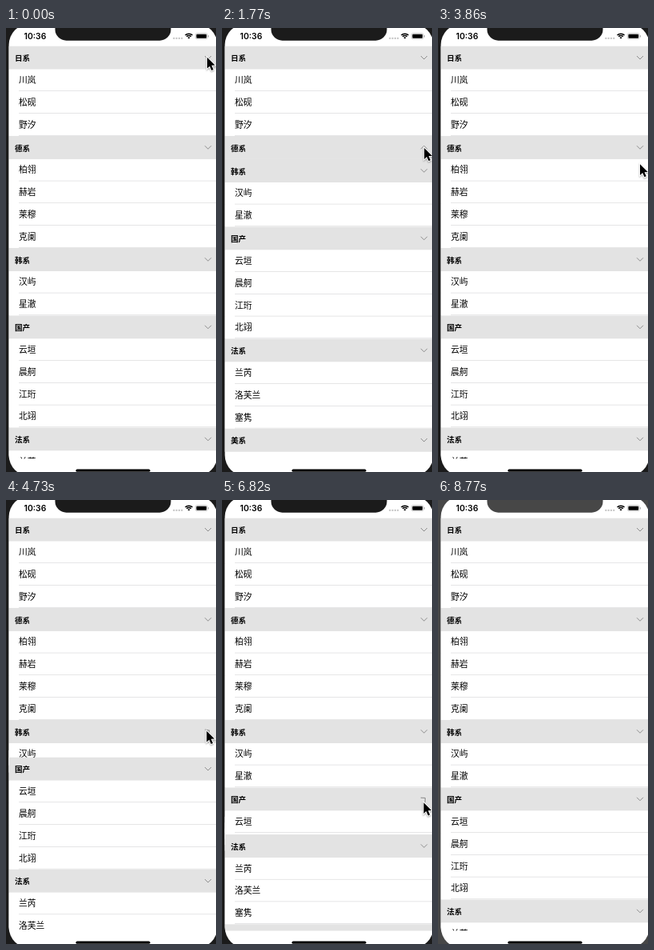
Write an HTML page with a canvas that moves like this. It is 263 px wide and 555 px high and loops after 8.87 s.

```html
<!DOCTYPE html>
<html lang="zh-CN">
<head>
<meta charset="utf-8">
<title>分组列表</title>
<style>
html, body { margin: 0; width: 100%; height: 100%; overflow: hidden; background: #fff; }
canvas { display: block; width: 263px; height: 555px; }
</style>
</head>
<body>
<canvas id="stage"></canvas>
<script>
const W = 263, H = 555, LOOP = 8870;
const TICK = 148.4, LEAD = 18;
const POINT = 0.6307; // one screen point in stage pixels
const HEAD = 46 * POINT, ROW = 44 * POINT;
const TOP = 22.7, LIST_END = 538.6;
const SCREEN = { x: 3.6, y: TOP - 44 * POINT, w: 414 * POINT, h: 896 * POINT, r: 41.5 * POINT };
const FOLD_TIME = 300, BLUR_AT = 8730;
const CJK = '"Noto Sans CJK SC", "Noto Sans CJK", sans-serif';

const sections = [
  { title: '日系', rows: ['川岚', '松砚', '野汐'] },
  { title: '德系', rows: ['柏翎', '赫岩', '莱穆', '克阑'] },
  { title: '韩系', rows: ['汉屿', '星澈'] },
  { title: '国产', rows: ['云垣', '晨舸', '江珩', '北翊'] },
  { title: '法系', rows: ['兰芮', '洛芙兰', '塞隽'] },
  { title: '美系', rows: [] }
];

// Taps: section, start time, whether it opens
const taps = [
  [1, 1160, false], [1, 2854, true],
  [2, 4544, false], [2, 5280, true],
  [3, 6610, false], [3, 7397, true]
];

// Pointer tip: time, x, y
const pointer = [
  [140, 251.3, 36], [1160, 253.5, 150], [1620, 253.5, 150], [1760, 252.7, 149.3],
  [3700, 252.7, 149.3], [4286, 250.7, 288], [5640, 250.7, 288],
  [6510, 252, 377.4], [7860, 252, 377.4], [8730, 268, 300]
];

const canvas = document.getElementById('stage');
const ctx = canvas.getContext('2d');
const ratio = window.devicePixelRatio || 1;
canvas.width = Math.round(W * ratio);
canvas.height = Math.round(H * ratio);

const clamp = v => Math.min(1, Math.max(0, v));
const ease = v => { const u = clamp(v); return u * u * (3 - 2 * u); };

function openness(index, t) {
  let open = 1;
  for (const [section, start, opens] of taps) {
    if (section !== index || t < start) continue;
    const p = ease((t - start) / FOLD_TIME);
    open = opens ? p : 1 - p;
  }
  return open;
}

function pointerAt(t) {
  if (t <= pointer[0][0]) return pointer[0].slice(1);
  for (let i = 1; i < pointer.length; i++) {
    const [t0, x0, y0] = pointer[i - 1], [t1, x1, y1] = pointer[i];
    if (t < t1) {
      const p = ease((t - t0) / (t1 - t0));
      return [x0 + (x1 - x0) * p, y0 + (y1 - y0) * p];
    }
  }
  return null;
}

function rect(color, x, y, w, h) {
  ctx.fillStyle = color;
  ctx.fillRect(x, y, w, h);
}

function roundRect(color, x, y, w, h, r) {
  ctx.fillStyle = color;
  ctx.beginPath();
  ctx.roundRect(x, y, w, h, r);
  ctx.fill();
}

function label(text, x, y, font) {
  ctx.fillStyle = '#000';
  ctx.font = font;
  ctx.fillText(text, x, y);
}

function chevron(y, open) {
  ctx.save();
  ctx.translate(253, y);
  ctx.rotate(-Math.PI * (1 - open));
  ctx.strokeStyle = '#858585';
  ctx.lineWidth = 0.9;
  ctx.beginPath();
  ctx.moveTo(-4, -2);
  ctx.lineTo(0, 2);
  ctx.lineTo(4, -2);
  ctx.stroke();
  ctx.restore();
}

function drawHeader(title, y, open) {
  rect('#e3e3e3', 0, y, W, HEAD);
  label(title, 11, y + 18.7, '700 9.6px ' + CJK);
  chevron(y + 14.3, open);
}

function drawRow(text, y) {
  rect('#fff', 0, y, W, ROW);
  label(text, 16, y + 17.5, '400 10.8px ' + CJK);
  rect('#c6c6c8', 16, y + ROW - 0.9, W, 0.45);
}

function drawList(t) {
  ctx.save();
  ctx.beginPath();
  ctx.rect(0, 0, W, LIST_END);
  ctx.clip();
  let y = TOP;
  sections.forEach(({ title, rows }, index) => {
    const open = openness(index, t);
    drawHeader(title, y, open);
    y += HEAD;
    // Upper rows cover the lower ones while folding
    if (open > 0) {
      for (let i = rows.length - 1; i >= 0; i--) drawRow(rows[i], y + i * ROW * open);
    }
    y += rows.length * ROW * open;
  });
  ctx.restore();
}

function drawWifi() {
  const x = 229, y = 13.6, from = -Math.PI * 0.75, to = -Math.PI * 0.25;
  ctx.strokeStyle = ctx.fillStyle = '#000';
  ctx.lineWidth = 1.5;
  for (const r of [6.4, 4]) {
    ctx.beginPath();
    ctx.arc(x, y, r, from, to);
    ctx.stroke();
  }
  ctx.beginPath();
  ctx.moveTo(x, y);
  ctx.arc(x, y, 2.3, from, to);
  ctx.fill();
}

function drawStatus() {
  label('10:36', 22.5, 14, '600 10.4px Inter, sans-serif');
  for (let i = 0; i < 4; i++) roundRect('#c6c6c6', 209.2 + i * 3.3, 11.8, 2.2, 2.2, 0.8);
  drawWifi();
  ctx.strokeStyle = '#b0b0b0';
  ctx.lineWidth = 0.6;
  ctx.beginPath();
  ctx.roundRect(237.3, 6.6, 15, 7.2, 2);
  ctx.stroke();
  roundRect('#000', 238.4, 7.7, 12.8, 5, 1);
  roundRect('#b0b0b0', 253, 9, 1, 2.4, 0.5);
}

function drawPointer(x, y) {
  ctx.save();
  ctx.translate(x, y);
  ctx.beginPath();
  ctx.moveTo(0.6, 0.8);
  ctx.lineTo(0.6, 14.6);
  ctx.lineTo(3.8, 11.7);
  ctx.lineTo(6.1, 17);
  ctx.lineTo(8.4, 16);
  ctx.lineTo(6.1, 10.8);
  ctx.lineTo(10.4, 10.6);
  ctx.closePath();
  ctx.shadowColor = 'rgba(0,0,0,0.35)';
  ctx.shadowBlur = 2 * ratio;
  ctx.shadowOffsetY = ratio;
  ctx.strokeStyle = '#fff';
  ctx.lineWidth = 2;
  ctx.stroke();
  ctx.shadowColor = 'transparent';
  ctx.fillStyle = '#000';
  ctx.fill();
  ctx.restore();
}

function draw(t) {
  const bezel = t >= BLUR_AT ? '#474747' : '#1b1b1b';
  ctx.setTransform(ratio, 0, 0, ratio, 0, 0);
  rect(bezel, 0, 0, W, H);
  ctx.save();
  ctx.beginPath();
  ctx.roundRect(SCREEN.x, SCREEN.y, SCREEN.w, SCREEN.h, SCREEN.r);
  ctx.clip();
  rect('#fff', 0, 0, W, H);
  drawList(t);
  drawStatus();
  roundRect('#000', 87.5, 551.6, 93, 3.2, 1.6);
  ctx.restore();
  roundRect(bezel, 61.5, -20, 145, 35.7, 14);
  const tip = pointerAt(t);
  if (tip) drawPointer(...tip);
}

function frame(now) {
  const t = now % LOOP;
  draw(Math.floor((t + LEAD) / TICK) * TICK - LEAD);
  requestAnimationFrame(frame);
}
requestAnimationFrame(frame);
</script>
</body>
</html>
```
